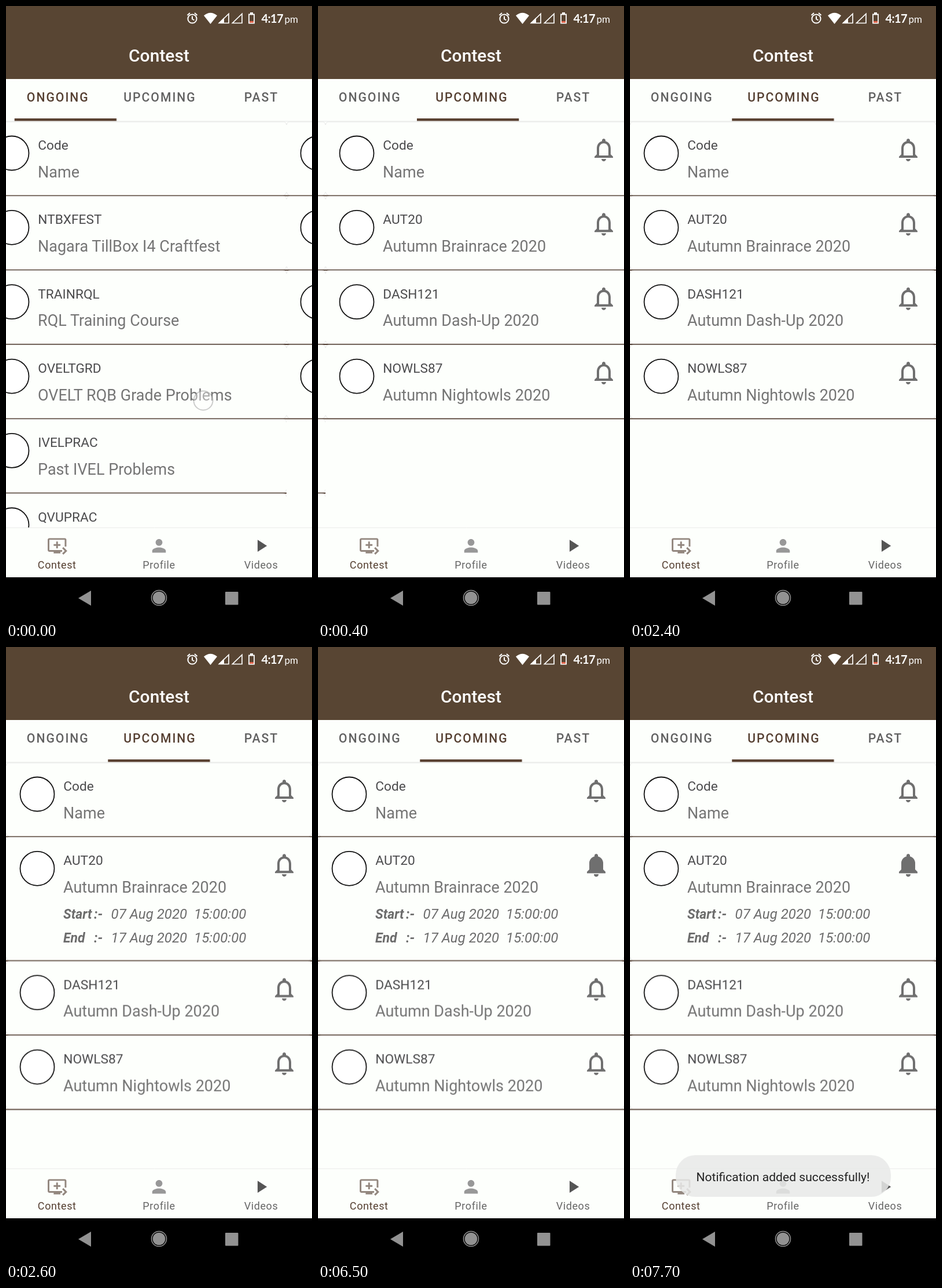
An HTML page for the animation above (8000 ms loop, 529 px wide and 1058 px high).

```html
<!DOCTYPE html>
<html lang="en">
<head>
<meta charset="utf-8">
<title>Contest</title>
<style>
html, body { margin: 0; height: 100%; overflow: hidden; background: #fdfffc; }
svg { display: block; width: 100vw; height: 100vh; font-family: Roboto, sans-serif; }
text { white-space: pre; }
.mid { text-anchor: middle; }
.code { font-size: 22.7px; fill: #4b4b4d; }
.name { font-size: 27px; fill: #757575; }
.date { font-size: 24.1px; font-style: italic; fill: #6c6c6c; }
.date .key { font-size: 23px; font-weight: 700; }
.edge { fill: none; stroke: #e6e7e6; }
.rule { stroke: #523e32; stroke-width: 1.9; }
.avatar { fill: #fff; stroke: #111; stroke-width: 1.8; }
.bell { fill: #6f6f6f; }
.tab { font-size: 21.2px; font-weight: 500; letter-spacing: 1.95px; fill: #616161; }
.label { font-size: 18px; letter-spacing: .6px; fill: #666; }
.clock { font-family: Lato, sans-serif; }

/* All motion advances in 100 ms steps: 1.25% of the loop */
.pager, .bar, .old, .new, .shift, .detail, .full, .toast, .dot {
  animation: 8s step-end infinite;
}
.pager { animation-name: pager; }
.bar { animation-name: bar; }
.old { animation-name: old; }
.new { animation-name: new; }
.shift { animation-name: shift; }
.detail { animation-name: detail; }
.full { animation-name: full; }
.toast { animation-name: toast; }
.dot { animation-name: dot; }

@keyframes pager {
  0% { transform: translateX(-44px); }
  1.25% { transform: translateX(-190px); }
  2.5% { transform: translateX(-382px); }
  3.75% { transform: translateX(-480px); }
  5% { transform: translateX(-516px); }
  6.25% { transform: translateX(-527px); }
  7.5%, 100% { transform: translateX(-529px); }
}
@keyframes bar {
  0% { transform: translateX(14.7px); }
  1.25% { transform: translateX(58px); }
  2.5% { transform: translateX(118px); }
  3.75% { transform: translateX(157px); }
  5% { transform: translateX(171px); }
  6.25% { transform: translateX(175.5px); }
  7.5%, 100% { transform: translateX(176.3px); }
}
@keyframes old {
  0% { fill: #553f31; }
  2.5%, 100% { fill: #616161; }
}
@keyframes new {
  0% { fill: #616161; }
  2.5%, 100% { fill: #553f31; }
}
@keyframes shift {
  0% { transform: none; }
  31.25%, 100% { transform: translateY(85.7px); }
}
@keyframes detail {
  0% { opacity: 0; }
  31.25%, 100% { opacity: 1; }
}
@keyframes full {
  0% { opacity: 0; }
  81.25%, 100% { opacity: 1; }
}
@keyframes toast {
  0% { opacity: 0; }
  82.5% { opacity: .1; }
  83.75% { opacity: .28; }
  85% { opacity: .5; }
  86.25% { opacity: .72; }
  87.5% { opacity: .9; }
  88.75%, 100% { opacity: 1; }
}
@keyframes dot {
  0% { transform: translate(341px, 681px); opacity: 1; }
  1.25% { transform: translate(308px, 687px); opacity: .8; }
  2.5% { transform: translate(275px, 692px); opacity: .4; }
  3.75% { transform: translate(496px, 375px); opacity: 0; }
  78.75% { transform: translate(496px, 375px); opacity: 1; }
  80% { transform: translate(496px, 375px); opacity: .6; }
  81.25%, 100% { transform: translate(496px, 375px); opacity: 0; }
}
</style>
</head>
<body>
<svg viewBox="0 0 529 1058">
  <defs>
    <path id="bell-full" d="M12 22c1.1 0 2-.9 2-2h-4c0 1.1.89 2 2 2zm6-6v-5c0-3.07-1.64-5.64-4.5-6.32V4c0-.83-.67-1.5-1.5-1.5s-1.5.67-1.5 1.5v.68C7.63 5.36 6 7.92 6 11v5l-2 2v1h16v-1l-2-2z"/>
    <path id="bell-line" d="M12 22c1.1 0 2-.9 2-2h-4c0 1.1.89 2 2 2zm6-6v-5c0-3.07-1.64-5.64-4.5-6.32V4c0-.83-.67-1.5-1.5-1.5s-1.5.67-1.5 1.5v.68C7.63 5.36 6 7.92 6 11v5l-2 2v1h16v-1l-2-2zm-2 1H8v-6c0-2.48 1.51-4.5 4-4.5s4 2.02 4 4.5v6z"/>
  </defs>
  <rect width="529" height="1058" fill="#fdfffc"/>

  <g class="pager">
    <g id="ongoing"></g>
    <g id="upcoming" transform="translate(529 0)"></g>
  </g>

  <!-- header and status bar -->
  <rect width="529" height="126" fill="#584533"/>
  <g fill="none" stroke="#fff" stroke-width="2">
    <circle cx="322" cy="22" r="7.6"/>
    <path d="M322 17.5v5l3.5 2M313.5 16l4.5-4M330.5 16l-4.5-4"/>
    <path d="M368.5 29.5H385V13.5zM391.5 29.5H408V13.5z" stroke-width="1.7"/>
    <path d="M420 14.500h9v15h-9z" stroke-width="1.8"/>
  </g>
  <g fill="#fff">
    <path d="M353.5 31L342 16.5q11.5-9.5 23 0z"/>
    <path d="M367 30h10v-10z"/>
    <path d="M422 11h5v3h-5z"/>
    <path d="M421 26h7v3h-7z" fill="#e2674f"/>
    <text class="clock" x="441.5" y="28.5" font-size="20" font-weight="700" letter-spacing="-.6">4:17</text>
    <text class="clock" x="481.5" y="28.5" font-size="17">pm</text>
    <text class="mid" x="264.5" y="96" font-size="30" font-weight="500">Contest</text>
  </g>

  <!-- tabs -->
  <rect y="126" width="529" height="73" fill="#fdfffc"/>
  <path d="M0 199H529" stroke="#e4e5e4"/>
  <text class="tab mid old" x="89.8" y="165">ONGOING</text>
  <text class="tab mid new" x="266" y="165">UPCOMING</text>
  <text class="tab mid" x="441.5" y="165">PAST</text>
  <rect class="bar" y="194" width="176.3" height="4.4" fill="#5a4232"/>

  <!-- bottom navigation -->
  <rect y="901" width="529" height="85" fill="#fdfffc"/>
  <path d="M0 900.5H529" stroke="#ebeceb"/>
  <path transform="translate(70.6 914) scale(1.47)" fill="#93877f" d="M21 3H3c-1.11 0-2 .89-2 2v12c0 1.1.89 2 2 2h5v2h8v-2h2v-2H3V5h18v8h2V5c0-1.110-.9-2-2-2zm-8 7V7h-2v3H8v2h3v3h2v-3h3v-2h-3zm11 8l-4.5 4.5L18 21l3-3-3-3 1.5-1.5L24 18z"/>
  <path transform="translate(246.9 914) scale(1.47)" fill="#989898" d="M12 12c2.21 0 4-1.79 4-4s-1.79-4-4-4-4 1.79-4 4 1.79 4 4 4zm0 2c-2.67 0-8 1.34-8 4v2h16v-2c0-2.66-5.33-4-8-4z"/>
  <path transform="translate(423.2 914) scale(1.47)" fill="#555" d="M8 5v14l11-7z"/>
  <text class="label mid" x="88.2" y="971" style="fill:#553f31">Contest</text>
  <text class="label mid" x="264.5" y="971">Profile</text>
  <text class="label mid" x="441" y="971">Videos</text>

  <!-- system keys -->
  <rect y="986" width="529" height="72"/>
  <g fill="#929292">
    <path d="M125 1022l22-13v26z"/>
    <circle cx="264.5" cy="1021.5" r="10.8"/>
    <circle cx="264.5" cy="1021.5" r="13" fill="none" stroke="#929292" stroke-width="1.5"/>
    <rect x="379" y="1011" width="22.5" height="22.5" rx="1"/>
  </g>

  <g class="toast">
    <rect x="79" y="877" width="372" height="72" rx="34" fill="#e8e9e8" fill-opacity=".86"/>
    <text class="mid" x="264.5" y="921.5" font-size="21.1" fill="#222">Notification added successfully!</text>
  </g>

  <g class="dot">
    <circle r="16.5" fill="#fff" fill-opacity=".4" stroke="#9a9a9a" stroke-opacity=".5" stroke-width="2"/>
  </g>
</svg>
<script>
const TOP = 199, PITCH = 128.35, OPEN_ROW = 1;

const bell = (y, kind, cls = '') =>
  `<use href="#bell-${kind}" class="bell ${cls}" transform="translate(457 ${y + 25}) scale(2)"/>`;

const dateLine = (y, key, value) =>
  `<text class="date" y="${y}"><tspan class="key" x="99">${key}</tspan>` +
  `<tspan class="key" x="152">:-</tspan><tspan x="181.5">${value}</tspan></text>`;

const details = y => `<g class="detail">
  ${dateLine(y + 141.7, 'Start', '07 Aug 2020  15:00:00')}
  ${dateLine(y + 183, 'End', '17 Aug 2020  15:00:00')}</g>`;

function row([code, name], i, upcoming) {
  const y = TOP + i * PITCH, base = y + PITCH;
  const opens = upcoming && i === OPEN_ROW;
  const moves = upcoming && i > OPEN_ROW;
  return `<g class="${moves ? 'shift' : ''}">
    <path class="edge" d="M.5 ${y + 6}q0-5 5-5H523.5q5 0 5 5"/>
    <circle class="avatar" cx="54" cy="${y + 55}" r="29.5"/>
    <text class="code" x="99.3" y="${y + 48.8}">${code}</text>
    <text class="name" x="99" y="${y + 96.5}">${name}</text>
    ${upcoming ? bell(y, 'line') : ''}
    ${opens ? bell(y, 'full', 'full') + details(y) : ''}
    <g class="${opens ? 'shift' : ''}">
      <path class="edge" d="M.5 ${base - 6}q0 4 4 5M528.5 ${base - 6}q0 4-4 5"/>
      <path class="rule" d="M0 ${base}H529"/>
    </g></g>`;
}

const fill = (id, rows) => {
  document.getElementById(id).innerHTML =
    rows.map((r, i) => row(r, i, id === 'upcoming')).join('');
};

fill('ongoing', [
  ['Code', 'Name'],
  ['NTBXFEST', 'Nagara TillBox I4 Craftfest'],
  ['TRAINRQL', 'RQL Training Course'],
  ['OVELTGRD', 'OVELT RQB Grade Problems'],
  ['IVELPRAC', 'Past IVEL Problems'],
  ['QVUPRAC', 'Past QVU Problems'],
]);
fill('upcoming', [
  ['Code', 'Name'],
  ['AUT20', 'Autumn Brainrace 2020'],
  ['DASH121', 'Autumn Dash-Up 2020'],
  ['NOWLS87', 'Autumn Nightowls 2020'],
]);
</script>
</body>
</html>
```
